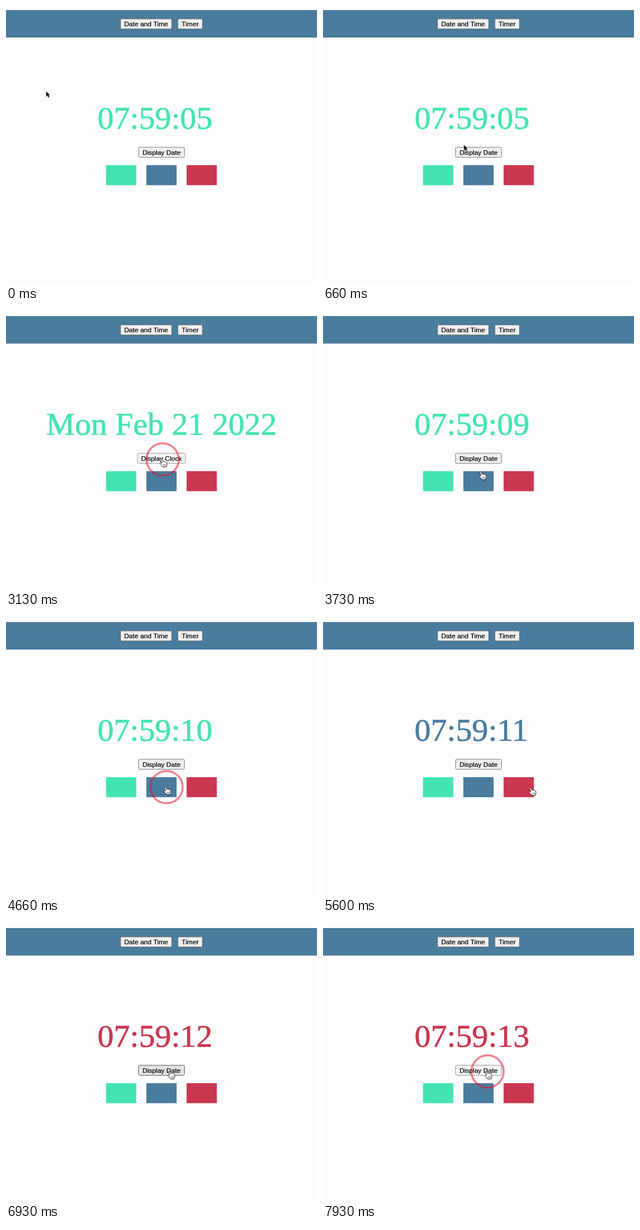
These frames come from a looping animation (536 px wide and 480 px high, 8000 ms). An HTML page with a canvas:

```html
<!DOCTYPE html>
<html lang="en">
<head>
<meta charset="utf-8">
<title>Clock</title>
<style>
html, body { margin: 0; width: 100%; height: 100%; overflow: hidden; background: #fdfdfd; }
canvas { display: block; }
</style>
</head>
<body>
<canvas id="stage" width="536" height="480"></canvas>
<script>
const ctx = document.getElementById('stage').getContext('2d');
const LOOP = 8000, STEP = 1000 / 15;
const ZOOM = .87;
const TEAL = '#43e4b3', BLUE = '#4a7c9d', RED = '#ca3750';
const SERIF = '64px "Liberation Serif", Times, serif';
const SANS = '13.33px "Liberation Sans", Arial, sans-serif';

const swatches = [[172.4, TEAL], [241.9, BLUE], [311.3, RED]];

// Pointer moves: first step, last step, from, to
const moves = [
  [0, 13, [69.3, 147.5], [270, 254.6]],
  [51, 60, [270, 254.6], [276.7, 292]],
  [80, 84, [276.7, 292], [359.7, 293.5]],
  [87, 89, [359.7, 293.5], [353.3, 295]],
  [98, 104, [353.3, 295], [283.6, 254.6]]
];

// Clicks: press step, release step, ring gone
const clicks = [[23, 25, 27], [47, 48, 50], [70, 71, 72], [92, 94, 95], [119, 121, 122]];

const hand = new Path2D('M-3.6 .4C-3.9-.9-1.8-1.3-1.3 .1L.2 3.8C.5 3.1 2.1 2.9 2.6 4C3.2 3.3 4.6 3.5 4.9 4.4' +
  'C5.7 4 6.9 4.5 7.1 5.7L7.4 8.6C7.4 10.2 6.4 10.8 6.2 12.7L.3 12.9C-.2 11.2-2.6 9.8-4.1 7.8' +
  'C-4.9 6.4-3.2 5.5-1.8 6.6L-1.5 6.9Z');
const knuckles = new Path2D('M1.4 8V11M3.2 8V11M5 8V11');
const arrow = new Path2D('M0 0V10.4L2.5 8.1 4.3 12 6.2 11.2 4.5 7.4H7.6Z');

function pointer(n) {
  let pos = moves[0][2];
  for (const [a, b, from, to] of moves) {
    if (n < a) break;
    const u = Math.min(1, (n - a) / (b - a));
    const e = u * u * (3 - 2 * u);
    pos = from.map((v, i) => v + (to[i] - v) * e);
  }
  return pos;
}

function inside([x, y], left, top, w, h) {
  return x >= left && x <= left + w && y >= top && y <= top + h;
}

function text(str, x, y, font, color, align, weight) {
  ctx.save();
  ctx.translate(x, y);
  ctx.scale(ZOOM, ZOOM);
  ctx.font = font;
  ctx.textAlign = align;
  ctx.fillStyle = ctx.strokeStyle = color;
  ctx.lineWidth = weight;
  ctx.lineJoin = 'round';
  ctx.fillText(str, 0, 0);
  ctx.strokeText(str, 0, 0);
  ctx.restore();
}

function button(label, x, y, w, state) {
  const h = 18.2;
  const [fill, edge] = {
    idle: ['#efefef', '#707070'],
    hover: ['#e4e4e4', '#4a4a4a'],
    active: ['#f5f5f5', '#8d8d8d']
  }[state];
  ctx.beginPath();
  ctx.roundRect(x + .45, y + .45, w - .9, h - .9, 2);
  ctx.fillStyle = fill;
  ctx.fill();
  ctx.strokeStyle = edge;
  ctx.lineWidth = .9;
  ctx.stroke();
  text(label, x + w / 2, y + 13.1, SANS, '#000', 'center', .25);
}

function seconds(n) {
  if (n < 48) return n < 14 ? 5 : 6;
  return 9 + Math.floor((n - 48) / 15);
}

function drawCursor([x, y], over) {
  ctx.save();
  ctx.translate(x, y);
  ctx.lineJoin = 'round';
  ctx.shadowColor = 'rgba(0,0,0,.3)';
  ctx.shadowBlur = 2;
  ctx.shadowOffsetY = 1;
  ctx.lineWidth = 1;
  ctx.fillStyle = over ? '#fff' : '#111';
  ctx.strokeStyle = over ? '#333' : '#fff';
  if (over) {
    ctx.fill(hand);
    ctx.shadowColor = 'transparent';
    ctx.stroke(hand);
    ctx.lineWidth = .7;
    ctx.stroke(knuckles);
  } else {
    ctx.scale(ZOOM, ZOOM);
    ctx.stroke(arrow);
    ctx.shadowColor = 'transparent';
    ctx.fill(arrow);
  }
  ctx.restore();
}

function drawRing([x, y], n) {
  const click = clicks.find(c => n >= c[0] && n < c[2]);
  if (!click) return;
  const [, up, gone] = click;
  const alpha = n < up ? 1 : (gone - n) / (gone - up + 1);
  ctx.beginPath();
  ctx.arc(x, y, 27.8, 0, Math.PI * 2);
  ctx.lineWidth = 3.5;
  ctx.strokeStyle = `rgba(226,20,45,${.52 * alpha})`;
  ctx.stroke();
}

function draw(n) {
  const pos = pointer(n);
  const showDate = n >= 25 && n < 48;
  const color = n < 71 ? TEAL : n < 94 ? BLUE : RED;

  ctx.fillStyle = '#fdfdfd';
  ctx.fillRect(0, 0, 536, 480);
  ctx.fillStyle = BLUE;
  ctx.fillRect(0, 7, 536, 47.5);
  button('Date and Time', 197, 21.8, 89, 'idle');
  button('Timer', 295.8, 21.8, 43.2, 'idle');

  if (showDate) text('Mon Feb 21 2022', 268, 212.2, SERIF, color, 'center', .8);
  else text('07:59:' + String(seconds(n)).padStart(2, '0'), 157.8, 212.2, SERIF, color, 'left', .8);

  const [left, width] = showDate ? [226.3, 83.4] : [228, 80];
  const onButton = inside(pos, left, 243.5, width, 18.2);
  const pressed = clicks.some(c => n >= c[0] && n < c[1]);
  const state = !onButton ? 'idle' : pressed ? 'active' : 'hover';
  button(showDate ? 'Display Clock' : 'Display Date', left, 243.5, width, state);

  let over = onButton;
  for (const [x, fill] of swatches) {
    ctx.fillStyle = fill;
    ctx.fillRect(x, 274.8, 52.1, 34.6);
    over = over || inside(pos, x, 274.8, 52.1, 34.6);
  }

  drawCursor(pos, over);
  drawRing(pos, n);
}

const start = performance.now();
function tick() {
  const t = (performance.now() - start) % LOOP;
  draw(Math.floor((t + 7) / STEP) % 120);
  requestAnimationFrame(tick);
}
tick();
</script>
</body>
</html>
```
